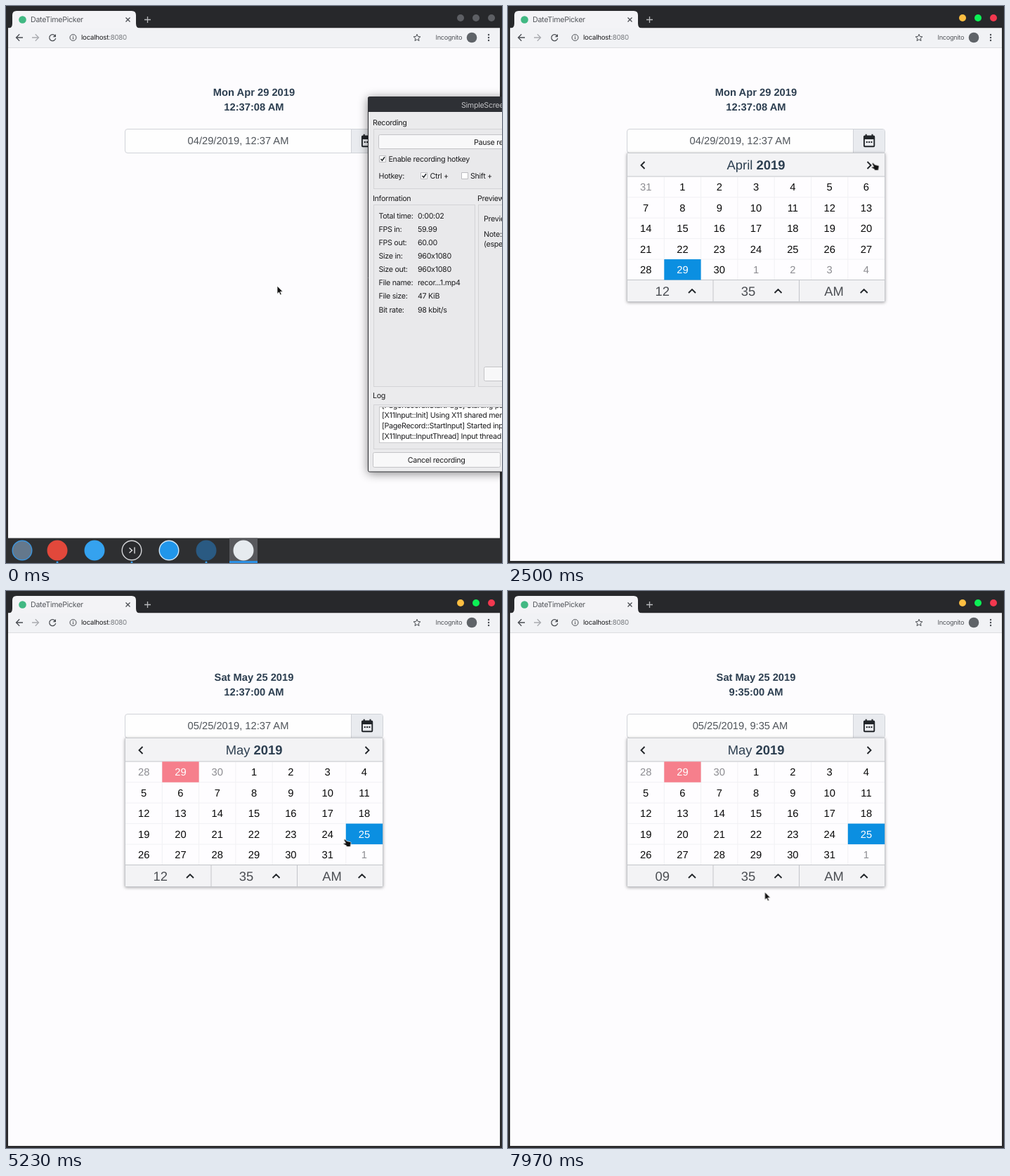
Recreate the animation shown at these times as an HTML page. Size 706 px wide and 794 px high, loop 8000 ms.

```html
<!DOCTYPE html>
<html lang="en">
<head>
<meta charset="utf-8">
<title>DateTimePicker</title>
<style>
html, body { margin: 0; height: 100%; overflow: hidden; background: #2b2b2d; }
#stage {
  display: block; width: 100vw; height: 100vh; text-rendering: geometricPrecision;
  font: 14.71px "Liberation Sans", Arial, sans-serif;
}
.mid { text-anchor: middle; }
.ui { font: 10.7px Inter, "Open Sans", sans-serif; letter-spacing: -.3px; fill: #1c1c1e; }
.line { fill: none; stroke: #212529; stroke-width: 1.9; }
.thin { fill: none; stroke: #4a4d52; stroke-width: 1.3; }
.hair { fill: none; stroke: #4a4d52; stroke-width: 1; }
.head { font-weight: bold; fill: #2c3e50; }
.field { fill: #4f545a; }
.big { font-size: 18.39px; fill: #4a4d52; }
.btn { fill: #f8f8f9; stroke: #c4c4c7; }
.group { fill: #e9e9eb; stroke: #d3d3d6; }
.check { fill: #fff; stroke: #bcbcc0; }
.popup { filter: drop-shadow(0 1px 2px #0005); }
.window { filter: drop-shadow(0 2px 7px #0007); }

/* visibility over one 8 s loop */
.intro, .awake, .open, .april, .may, .may29, .may25, .noon, .noonHour, .nine, .list, .shut, .hov5, .hov9, .arrow, .hand {
  animation: 8s step-end infinite;
}
.intro { animation-name: intro; }
.awake { animation-name: awake; }
.open { animation-name: open; }
.april { animation-name: april; }
.may { animation-name: may; }
.may29 { animation-name: may29; }
.may25 { animation-name: may25; }
.noon { animation-name: noon; }
.noonHour { animation-name: noonHour; }
.nine { animation-name: nine; }
.list { animation-name: list; }
.shut { animation-name: shut; }
.hov5 { animation-name: hov5; }
.hov9 { animation-name: hov9; }
.arrow { animation-name: arrow; }
.hand { animation-name: hand; }
@keyframes intro { 0% { opacity: 1 } 1.5%, 100% { opacity: 0 } }
@keyframes awake { 0% { opacity: 0 } 1.5%, 100% { opacity: 1 } }
@keyframes open { 0% { opacity: 0 } 25%, 100% { opacity: 1 } }
@keyframes april { 0% { opacity: 1 } 41.25%, 100% { opacity: 0 } }
@keyframes may { 0% { opacity: 0 } 41.25%, 100% { opacity: 1 } }
@keyframes may29 { 0% { opacity: 0 } 41.25% { opacity: 1 } 62.5%, 100% { opacity: 0 } }
@keyframes may25 { 0% { opacity: 0 } 62.5%, 100% { opacity: 1 } }
@keyframes noon { 0% { opacity: 0 } 62.5% { opacity: 1 } 93%, 100% { opacity: 0 } }
@keyframes noonHour { 0% { opacity: 1 } 93%, 100% { opacity: 0 } }
@keyframes nine { 0% { opacity: 0 } 93%, 100% { opacity: 1 } }
@keyframes list { 0% { opacity: 0 } 78.2% { opacity: 1 } 93%, 100% { opacity: 0 } }
@keyframes shut { 0% { opacity: 1 } 78.2% { opacity: 0 } 93%, 100% { opacity: 1 } }
@keyframes hov5 { 0% { opacity: 0 } 81.5% { opacity: 1 } 88.5%, 100% { opacity: 0 } }
@keyframes hov9 { 0% { opacity: 0 } 88.5%, 100% { opacity: 1 } }
@keyframes arrow { 0% { opacity: 1 } 11.8% { opacity: 0 } 93%, 100% { opacity: 1 } }
@keyframes hand { 0% { opacity: 0 } 11.8% { opacity: 1 } 93%, 100% { opacity: 0 } }

.dock { animation: dock 8s ease-in infinite; }
@keyframes dock { 0%, 1.5% { transform: none } 5%, 100% { transform: translateY(38px) } }

.rows { animation: rows 8s linear infinite; }
@keyframes rows {
  0%, 81.5% { transform: none }
  86.6% { transform: translateY(-149px); animation-timing-function: ease-out }
  88.2%, 100% { transform: translateY(-161.5px) }
}

.cursor { animation: cursor 8s ease-in-out infinite; }
@keyframes cursor {
  0%, 4% { transform: translate(386px, 399px) }
  10.4% { transform: translate(529px, 217px); animation-timing-function: ease-out }
  16.6%, 26.3% { transform: translate(517.5px, 197px) }
  32.5% { transform: translate(517.5px, 225px); animation-timing-function: ease-out }
  38.4%, 43.1% { transform: translate(514.5px, 228px) }
  52.9% { transform: translate(512.3px, 322px); animation-timing-function: ease-out }
  58.75%, 63.2% { transform: translate(507px, 345px) }
  72.1% { transform: translate(294px, 409px); animation-timing-function: ease-out }
  74.1%, 78.2% { transform: translate(278.5px, 405px) }
  83.75%, 92.5% { transform: translate(244.5px, 528px); animation-timing-function: ease-in }
  97.1% { transform: translate(298px, 499px); animation-timing-function: linear }
  99.6%, 100% { transform: translate(365.5px, 429px) }
}
</style>
</head>
<body>
<svg id="stage" viewBox="0 0 706 794">
  <!-- browser window -->
  <rect width="706" height="794" fill="#2b2b2d"/>
  <rect width="706" height="32" fill="#27282b"/>
  <rect x="3" y="31.5" width="700" height="759.5" fill="#fdfcfe"/>
  <rect x="3" y="31.5" width="700" height="28" fill="#f1f2f5"/>
  <path d="M3 59.5H703" stroke="#dcdde0"/>
  <path d="M3 32Q9 32 9 25V13Q9 7 15 7H179Q185 7 185 13V25Q185 32 191 32Z" fill="#f3f3f6"/>
  <circle cx="23.5" cy="19.5" r="5.3" fill="#41b883"/>
  <text class="ui" x="35" y="23" style="fill:#55585d">DateTimePicker</text>
  <path class="thin" d="M170.5 16.5l6 6m0-6l-6 6"/>
  <path d="M197 19.5h9m-4.5-4.5v9" stroke="#b9babd" stroke-width="1.3"/>
  <g class="intro" fill="#5d5f64"><circle cx="647" cy="17" r="5"/><circle cx="669" cy="17" r="5"/><circle cx="691" cy="17" r="5"/></g>
  <g class="awake">
    <circle cx="647" cy="17" r="5" fill="#fdbe41"/>
    <circle cx="669" cy="17" r="5" fill="#0cf055"/>
    <circle cx="691" cy="17" r="5" fill="#f2384f"/>
  </g>
  <path class="thin" d="M24 45H14.5m4.7-4.7L14.5 45l4.7 4.7"/>
  <path class="thin" style="stroke:#a9abaf" d="M37 45h9.5m-4.7-4.7L46.5 45l-4.7 4.7"/>
  <path class="thin" d="M69.5 42a4.5 4.5 0 1 0 1.2 4"/>
  <path d="M71 40v4.3h-4.3z" fill="#4a4d52"/>
  <circle class="hair" cx="95.5" cy="45" r="4.5"/>
  <path class="hair" d="M95.5 44.3v3.2M95.5 42.2v1.2"/>
  <text class="ui" x="107" y="48.3" style="font-size:9.7px;letter-spacing:-.25px">localhost<tspan fill="#777a7e">:8080</tspan></text>
  <path class="hair" d="M585 40.3l1.4 3.2 3.5.3-2.7 2.3.8 3.5-3-1.9-3 1.9.8-3.5-2.7-2.3 3.5-.3z"/>
  <text class="ui" x="611.5" y="48.3" style="font-size:9.2px;fill:#55585d">Incognito</text>
  <circle cx="663" cy="45" r="7.3" fill="#5f6368"/>
  <g fill="#4a4d52"><circle cx="687" cy="41" r="1.2"/><circle cx="687" cy="45" r="1.2"/><circle cx="687" cy="49" r="1.2"/></g>

  <!-- field -->
  <rect x="169.5" y="175.5" width="367" height="34" rx="3.5" fill="#fefefe" stroke="#d0d3d8"/>
  <path d="M491.5 176H533q3 0 3 3v27q0 3-3 3h-41.5z" fill="#e9ebef"/>
  <path d="M491.5 176v33" stroke="#d0d3d8"/>
  <rect class="line" x="506.9" y="185.4" width="14.4" height="14.8" rx="1"/>
  <path d="M506.5 185h15v5h-15zM508.7 182.8h2v3h-2zm8.8 0h2v3h-2z" fill="#212529"/>
  <path d="M509.8 193h2v2h-2zm3.3 0h2v2h-2zm3.3 0h2v2h-2z" fill="#212529"/>
  <g id="values" class="mid"></g>

  <!-- hour list -->
  <g class="list">
    <svg x="169" y="422" width="124" height="229.5" overflow="hidden">
      <path d="M.5 0V229H123.500V0" fill="#fefefe" stroke="#d8dade"/>
      <g id="hours" class="rows mid"></g>
    </svg>
  </g>

  <!-- calendar -->
  <g class="open">
    <g class="popup">
      <rect x="169.5" y="209.5" width="367" height="212" rx="1.5" fill="#fefdff" stroke="#c6c8cc"/>
      <path d="M170 210H536V243H170zM170 391H536V421H170z" fill="#f3f3f5"/>
    </g>
    <path d="M170 243H536M170 390.500H536M292 391v30.500M414.500 391v30.500" stroke="#c3c5c9"/>
    <path class="line" d="M194.500 222l-5 5 5 5M511.500 222l5 5-5 5"/>
    <g class="mid big" style="fill:#2c3e50">
      <text class="april" x="353" y="232.700">April <tspan font-weight="bold">2019</tspan></text>
      <text class="may" x="353" y="232.700">May <tspan font-weight="bold">2019</tspan></text>
    </g>
    <path id="grid" stroke="#f1f1f4"/>
    <g id="days" class="mid"></g>
    <g class="mid big">
      <text class="noonHour" x="219.7" y="412.8">12</text>
      <text class="nine" x="219.7" y="412.8">09</text>
      <text x="342" y="412.8">35</text>
      <text x="464" y="412.8">AM</text>
    </g>
    <path class="line shut" d="M257 409l5-5 5 5"/>
    <path class="line list" d="M257 404l5 5 5-5"/>
    <path class="line" d="M379.5 409l5-5 5 5M501.7 409l5-5 5 5"/>
  </g>

  <!-- recorder window -->
  <g class="intro ui">
    <rect class="window" x="515.5" y="129.5" width="200" height="534.5" rx="2" fill="#ebebed" stroke="#2e2f33"/>
    <path d="M515 151V131.5q0-2 2-2H706V151z" fill="#2e3035"/>
    <text x="648" y="144.5" style="fill:#c0c1c4">SimpleScreenRecorder</text>
    <text x="522" y="169.5">Recording</text>
    <rect class="group" x="523.5" y="175.5" width="200" height="85"/>
    <rect class="btn" x="530.5" y="183.5" width="200" height="20" rx="2"/>
    <text x="666" y="197.5">Pause recording</text>
    <path class="check" d="M531.5 213.5h9v9h-9zM590.5 237.5h9v9h-9zM648.5 237.5h9v9h-9z"/>
    <path class="line" style="stroke-width:1.5" d="M533.5 218l2 2.3 3.5-5M592.5 242l2 2.3 3.5-5"/>
    <text x="544.5" y="221.5">Enable recording hotkey</text>
    <text x="530.5" y="246">Hotkey:</text>
    <text x="603.5" y="246">Ctrl +</text>
    <text x="661" y="246">Shift +</text>
    <text x="522" y="277.5">Information</text>
    <text x="671" y="277.5">Preview</text>
    <rect class="group" x="523.5" y="283.5" width="144" height="259"/>
    <rect class="group" x="672.5" y="283.5" width="60" height="259"/>
    <g id="info"></g>
    <text x="680" y="306.5">Preview frame rate:</text>
    <text x="680" y="328.5">Note: Previewing</text>
    <text x="680" y="342.5">(especially</text>
    <rect class="btn" x="680.5" y="514.5" width="60" height="20" rx="2"/>
    <text x="522" y="558.5">Log</text>
    <rect class="group" x="523.5" y="568.5" width="200" height="63"/>
    <rect x="531.5" y="571.5" width="200" height="51" fill="#fff" stroke="#c8c8cb"/>
    <svg x="532" y="572" width="174" height="50" overflow="hidden">
      <text x="3" y=".5">[PageRecord::StartPage] Starting page ...</text>
      <text x="3" y="15">[X11Input::Init] Using X11 shared memory.</text>
      <text x="3" y="30">[PageRecord::StartInput] Started input.</text>
      <text x="3" y="44.5">[X11Input::InputThread] Input thread started.</text>
    </svg>
    <rect class="btn" x="522.5" y="636.5" width="181" height="21" rx="2"/>
    <text class="mid" x="612.7" y="651">Cancel recording</text>
  </g>

  <!-- dock -->
  <g class="dock">
    <rect y="758.5" width="706" height="36" fill="#2e2f31"/>
    <rect x="318" y="758.5" width="40" height="36" fill="#58595d"/>
    <rect x="318" y="791" width="40" height="3" fill="#2b8fe3"/>
    <g id="icons"></g>
    <path d="M175.5 772.5l4 3.5-4 3.5M183 771.5v9" fill="none" stroke="#e8e8ea" stroke-width="1.3"/>
    <g fill="#3aa0ee"><circle cx="73" cy="793" r="1.5"/><circle cx="179" cy="793" r="1.5"/><circle cx="285" cy="793" r="1.5"/></g>
  </g>

  <g class="cursor" stroke="#fff" stroke-width=".8" fill="#111">
    <path class="arrow" d="M0 0V11.4l2.6-2.4 1.8 4 1.9-.8-1.8-3.9H8z"/>
    <path class="hand" d="M1 1.600Q1.400 .4 2.600 1L4.600 3.400 9.600 4.600Q11 5.200 10.600 6.800L10 9.400V11.600H4V10L.2 8Q-.6 6.600 .6 6.200L3 6.400 .9 2.600Q.6 2 1 1.600Z"/>
  </g>
</svg>
<script>
const fill = (id, html) => document.getElementById(id).innerHTML = html;
const range = n => [...Array(n).keys()];
const LEFT = 170, TOP = 243.25, COL = 52.3, ROW = 29.45, ITEM = 32.55;

// heading and field text for each state of the picker
fill('values', [
  ['april', 'Mon Apr 29 2019', '12:37:08 AM', '04/29/2019, 12:37 AM'],
  ['may29', 'Wed May 29 2019', '12:37:36 AM', '05/29/2019, 12:37 AM'],
  ['noon', 'Sat May 25 2019', '12:37:00 AM', '05/25/2019, 12:37 AM'],
  ['nine', 'Sat May 25 2019', '9:35:00 AM', '05/25/2019, 9:35 AM']
].map(([state, day, time, value]) => `<g class="${state}">
  <text class="head" x="353" y="128">${day}</text>
  <text class="head" x="353" y="149.3">${time}</text>
  <text class="field" x="330.5" y="197">${value}</text></g>`).join(''));

function month(state, lead, before, length, today, picked) {
  const cells = range(35).map(i => {
    const n = i - lead + 1;
    const inside = n > 0 && n <= length;
    const label = n < 1 ? before + n : inside ? n : n - length;
    const x = LEFT + i % 7 * COL, y = TOP + Math.floor(i / 7) * ROW;
    const mark = i === picked ? '#0b8fe1' : i === today ? '#f67f8c' : '';
    const box = mark && `<rect x="${x}" y="${y}" width="${COL}" height="${ROW}" fill="${mark}"/>`;
    const ink = mark ? '#fff' : inside ? '#080808' : '#8b8b90';
    return `${box}<text x="${x + COL / 2}" y="${y + 19.9}" fill="${ink}">${label}</text>`;
  });
  return `<g class="${state}">${cells.join('')}</g>`;
}
fill('days', month('april', 1, 31, 30, 29, 29) + month('may29', 3, 30, 31, 1, 31) + month('may25', 3, 30, 31, 1, 27));

document.getElementById('grid').setAttribute('d',
  range(6).map(i => `M${LEFT + (i + 1) * COL} 244V390`).join('') +
  range(4).map(i => `M170 ${TOP + (i + 1) * ROW}H536`).join(''));

fill('hours', range(12).map(i => {
  const y = i * ITEM;
  if (i === 11) {
    return `<rect y="${y - .5}" width="124" height="${ITEM + 1}" fill="#0b84f8"/><text x="62" y="${y + 21.2}" fill="#fff">12</text>`;
  }
  const hover = i === 4 || i === 8
    ? `<rect class="hov${i + 1}" x="1" y="${y}" width="122" height="${ITEM}" fill="#f4f4f6"/>` : '';
  return `${hover}<path d="M1 ${y}H123" stroke="#dcdee2"/>
    <text class="field" x="62" y="${y + 21.2}">${String(i + 1).padStart(2, '0')}</text>`;
}).join(''));

fill('info', [
  ['Total time:', '0:00:02'], ['FPS in:', '59.99'], ['FPS out:', '60.00'], ['Size in:', '960x1080'],
  ['Size out:', '960x1080'], ['File name:', 'recor...1.mp4'], ['File size:', '47 KiB'], ['Bit rate:', '98 kbit/s']
].map(([name, value], i) => {
  const y = 302.5 + i * 19.15;
  return `<text x="530.5" y="${y}">${name}</text><text x="586" y="${y}">${value}</text>`;
}).join(''));

fill('icons', [
  [23, '#64788c', '#3d95dc'], [73, '#e2483b', '#e2483b'], [126, '#35a2ef', '#35a2ef'], [179, '#2a2b2e', '#d6d7da'],
  [232, '#2196ea', '#cfe6f8'], [285, '#2a5a82', '#2a5a82'], [338, '#e6ebef', '#e6ebef']
].map(([x, color, rim]) =>
  `<circle cx="${x}" cy="776" r="13.8" fill="${color}" stroke="${rim}" stroke-width="1.4"/>`).join(''));
</script>
</body>
</html>
```
